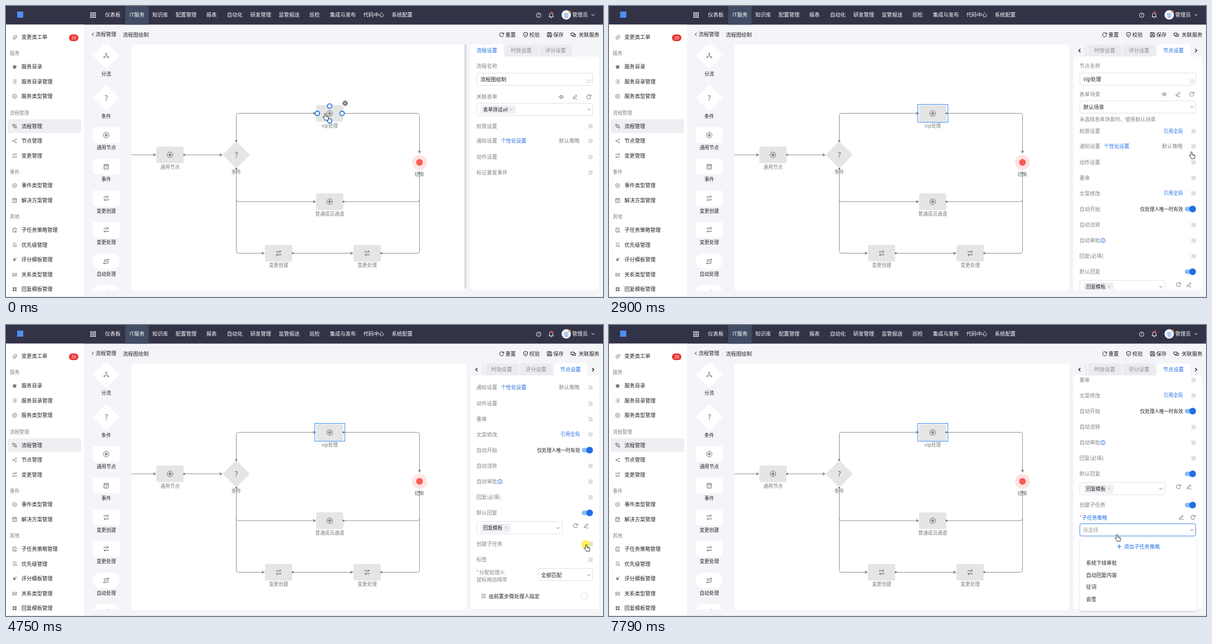
These frames come from a looping animation (1072x522 px, 8 s). An HTML page:

```html
<!DOCTYPE html>
<html lang="zh">
<head>
<meta charset="utf-8">
<title>流程图绘制</title>
<style>
html, body { margin: 0; width: 100%; height: 100%; overflow: hidden; background: #f4f5f9; }
svg { display: block; width: 100%; height: 100%; }
text { font-family: "Noto Sans CJK SC", "Noto Sans CJK", "Noto Sans", sans-serif; white-space: pre; }
</style>
</head>
<body>
<script>
const LOOP = 8000, BLUE = '#1f6fe5', INK = '#212226', GREY = '#808288', BORDER = '#dfe1e6';
let css = '', animCount = 0;

// Keyframes given in milliseconds; returns the class that plays them.
function anim(frames, ease = 'step-end') {
  const name = 'a' + animCount++;
  const all = [[0, frames[0][1]], ...frames, [LOOP, frames.at(-1)[1]]];
  css += `@keyframes ${name}{${all.map(([t, s]) => `${t / LOOP * 100}%{${s}}`).join('')}}` +
    `.${name}{animation:${name} ${LOOP}ms ${ease} infinite}`;
  return name;
}
const g = (content, cls = '', attrs = '') => `<g class="${cls}" ${attrs}>${content}</g>`;
const during = (from, to, content) => g(content, anim([
  ...(from ? [[0, 'opacity:0']] : []), [from, 'opacity:1'], ...(to < LOOP ? [[to, 'opacity:0']] : [])]));
const fadeIn = (from, to, content) => g(content, anim([[from, 'opacity:0'], [to, 'opacity:1']], 'linear'));
const fadeOut = (from, to, content) => g(content, anim([[from, 'opacity:1'], [to, 'opacity:0']], 'linear'));
const move = (points, ease) => anim(points.map(([t, x, y]) => [t, `transform:translate(${x}px,${y}px)`]), ease);

const rect = (x, y, w, h, fill, r = 0, stroke = 'none') =>
  `<rect x="${x}" y="${y}" width="${w}" height="${h}" rx="${r}" fill="${fill}" stroke="${stroke}"/>`;
const circle = (x, y, r, fill, stroke = 'none', width = 1) =>
  `<circle cx="${x}" cy="${y}" r="${r}" fill="${fill}" stroke="${stroke}" stroke-width="${width}"/>`;
const path = (d, stroke, width = 1, fill = 'none') =>
  `<path d="${d}" fill="${fill}" stroke="${stroke}" stroke-width="${width}"/>`;
const text = (x, y, s, fill = INK, size = 9.3, anchor = 'start', cls = '') =>
  `<text class="${cls}" x="${anchor === 'start' ? x - .2 : x}" y="${y + size * .37}" font-size="${size}" fill="${fill}" text-anchor="${anchor}">${s}</text>`;
const label = (x, y, s, fill = INK) => text(x, y, s, fill, 8.67, 'middle');

const ring = (x, y, r) => `M${x - r} ${y}a${r} ${r} 0 1 0 ${2 * r} 0a${r} ${r} 0 1 0 ${-2 * r} 0`;
const ICONS = {
  target: ring(0, 0, 5) + ring(0, 0, 2) + ring(0, 0, 1),
  swap: 'M-4 -1V-3H4M2 -5L4 -3L2 -1M4 1V3H-4M-2 1L-4 3L-2 5M-1 0H1',
  calendar: 'M-4 -3.5H4V4.5H-4ZM-4 -1.3H4M-2 -5V-3M2 -5V-3M-1.7 1.4L-.3 2.8L2 .4',
  branch: ring(0, -3.5, 1.2) + ring(-3.5, 3, 1.2) + ring(3.5, 3, 1.2) + 'M0 -2V0L-3 2M0 0L3 2',
  loop: 'M5 -3H-3A2 2 0 0 0 -3 0H3A2 2 0 0 1 3 3.5H-5M3 -5L5 -3L3 -1M-3 1.5L-5 3.5L-3 5.5',
  tag: 'M-4 1L1 -4L4 -3L4 0L-1 5ZM-2 1L1 -2M0 3L3 0',
  star: 'M0 -4L1.2 -1.3L4.2 -1L2 1L2.6 4L0 2.4L-2.6 4L-2 1L-4.2 -1L-1.2 -1.3Z',
  list: 'M-4 -3H-3M-2 -3H4M-4 0H-3M-2 0H4M-4 3H-3M-2 3H4',
  menu: 'M-4 -3H4M-4 0H4M-4 3H4',
  bolt: ring(0, 0, 4.2) + 'M.5 -2.5L-1.3 .3H1.3L-.5 2.5',
  flow: 'M-4 -4H-1V-1H-4ZM1 1H4V4H1ZM-2.5 -1V2.5H1M-1 -2.5H2.5V1',
  share: ring(-3, 0, 1) + ring(3, -3, 1) + ring(3, 3, 1) + 'M-2 -.5L2 -2.6M-2 .5L2 2.6',
  hex: 'M0 -4.4L3.8 -2.2V2.2L0 4.4L-3.8 2.2V-2.2ZM-2 -1L0 0L2 -1M0 0V2.5',
  task: 'M-3.5 -3.5H3.5V0M-3.5 -3.5V4H0M-1.5 -4.5H1.5M-1.5 0H1M0 4L2 1L4 4Z',
  priority: 'M-4 -3.5H4M-4 0H0M-4 3.5H-1' + ring(2.3, 2, 1.8),
  spark: 'M-.5 -2.5L.5 -.5L2.5 0L.5 1L-.5 3L-1.5 1L-3 0L-1.5 -.5ZM3 -4V-2M2 -3H4M-3.5 -3.5H-2.5',
  relation: 'M-4 -3H-1V3H-4ZM1 -3H4V0H1M1 2H4M2 3.5H4M-1 0H1',
  tiles: 'M-3.5 -3.5H-.8V-1H-3.5ZM1 -3.5H3.5V-1H1ZM-3.5 1H-.8V3.5H-3.5ZM1 1H3.5V3.5H1Z',
  refresh: 'M3.3 -1.7A3.7 3.7 0 1 0 3.6 1M3.8 -3.8V-1.2H1.2',
  shield: 'M0 -4.2L3.5 -3V0Q3.5 3 0 4.3Q-3.5 3 -3.5 0V-3ZM-1.6 0L-.2 1.3L1.8 -1',
  save: 'M-3.8 -3.8H2.5L3.8 -2.5V3.8H-3.8ZM-1.5 -3.5V-1H1.5V-3.5M-2 3.5V1H2V3.5',
  link: 'M-4.2 -3H1.5V1H-4.2ZM-1.5 1V3H4.2V-1H1.5',
  eye: 'M-4.3 0Q0 -5.4 4.3 0Q0 5.4 -4.3 0Z' + ring(0, 0, 1),
  pen: 'M-3 1.4L2 -3.6L3.5 -2L-1.4 3L-3.5 3.5ZM0 4H4',
  down: 'M-2.6 -1.3L0 1.3L2.6 -1.3',
  up: 'M-2.6 1.3L0 -1.3L2.6 1.3',
  left: 'M1.5 -3L-1.5 0L1.5 3',
  right: 'M-1.5 -3L1.5 0L-1.5 3',
  cross: 'M-2 -2L2 2M2 -2L-2 2',
  bell: 'M-4 3H4L3 1.5V-1A3 3 0 0 0 -3 -1V1.5ZM-1 4.6H1',
};
const icon = (name, x, y, color = '#6b6e75', width = 1, fill = 'none') =>
  `<g transform="translate(${x} ${y})">${path(ICONS[name], color, width, fill)}</g>`;

function header() {
  const nav = [[178, '仪表板'], [222, 'IT服务'], [263, '知识库'], [305, '配置管理'], [360, '报表'], [397, '自动化'],
    [439, '研发管理'], [490, '监管报送'], [545, '巡检'], [582, '集成与发布'], [642, '代码中心'], [693, '系统配置']];
  let out = rect(0, 0, 1072, 33.4, '#333348') + rect(214, 0, 42, 33.4, '#424c62') + rect(20, 10, 11, 11, '#4e8ef5');
  for (let i = 0; i < 9; i++) out += rect(151.5 + i % 3 * 3.6, 11.5 + Math.floor(i / 3) * 3.6, 2.4, 2.4, '#fff');
  out += nav.map(([x, s]) => text(x, 16, s, '#fff')).join('');
  out += circle(956.5, 16.5, 4, 'none', '#fff') + text(956.5, 16.5, '?', '#fff', 6.5, 'middle');
  out += icon('bell', 979, 16.5, '#fff') + circle(980, 12, 2, '#f0453f');
  out += circle(1006, 16, 8.5, '#eef3fb') + text(1006, 16.5, '管', '#5a8fe0', 8.5, 'middle') + circle(1012, 10.5, 2, '#f0a04b');
  return out + text(1017, 16, '管理员', '#fff') + icon('down', 1054, 16, '#fff');
}

function sidebar() {
  const heads = [[85, '服务'], [192, '流程管理'], [298, '事件'], [378, '其他']];
  const items = [[56, 'tag', '变更类工单'], [109, 'star', '服务目录'], [135.5, 'list', '服务目录管理'], [162, 'bolt', '服务类型管理'],
    [215.5, 'flow', '流程管理'], [242, 'share', '节点管理'], [268.5, 'swap', '变更管理'], [322, 'hex', '事件类型管理'],
    [348.5, 'calendar', '解决方案管理'], [402, 'task', '子任务策略管理'], [428.5, 'priority', '优先级管理'],
    [455, 'spark', '评分模板管理'], [482, 'relation', '关系类型管理'], [508, 'tiles', '回复模板管理']];
  const solid = ['star', 'tiles', 'spark'];
  return rect(0, 33.4, 140, 489, '#fff') + rect(3, 203, 132, 25, '#eeeff2', 3) +
    heads.map(([y, s]) => text(7, y, s, GREY, 8.67)).join('') +
    items.map(([y, i, s]) => `<g transform="translate(15.5 ${y}) scale(.88)">${path(ICONS[i], '#6b6e75', 1, solid.includes(i) ? '#6b6e75' : 'none')}</g>` + text(28, y, s)).join('') +
    rect(113, 51, 17, 12, '#e93533', 6) + text(121.5, 57, '39', '#fff', 8, 'middle');
}

function toolbar() {
  const tools = [[890, 'refresh', '重置'], [933, 'shield', '校验'], [976, 'save', '保存'], [1018.5, 'link', '关联服务']];
  return icon('left', 156, 51, INK) + text(161, 51, '流程管理') + rect(204, 42, 1, 18, '#e6e8ec') + text(210, 51.5, '流程图绘制') +
    tools.map(([x, i, s]) => icon(i, x, 51.5, INK) + text(x + (s.length > 2 ? 10 : 7), 51.5, s)).join('');
}

const diamond = (x, y, r, fill) => path(`M${x} ${y - r}L${x + r} ${y}L${x} ${y + r}L${x - r} ${y}Z`, fill, 2, fill);
const question = (x, y) => text(x, y, '?', '#666', 13, 'middle');

function palette() {
  const boxes = [[231.5, 'target', '通用节点'], [288, 'calendar', '事件'], [345, 'swap', '变更创建'], [401.5, 'swap', '变更处理'], [458, 'loop', '自动处理'], [514.5, 'loop', '']];
  const out = diamond(180, 89, 22.5, '#fff') + icon('branch', 180, 89) + label(180, 121.5, '分流') +
    diamond(180, 165, 22.5, '#fff') + question(180, 165) + label(180, 197.5, '条件') +
    boxes.map(([y, i, s]) => rect(156, y - 14, 48, 28, '#fff', i === 'loop' ? 14 : 2) + icon(i, 180, y) + label(180, y + 22.5, s)).join('');
  return g(out, '', 'clip-path="url(#work)"');
}

const EDGE = '#8f8f8f';
const node = (x, y, i, s) => rect(x - 24.5, y - 15, 49, 30, '#e5e5e5', 3) + icon(i, x, y, '#6a6a6a') + label(x, y + 21.7, s, '#76787c');
const arrow = (x, y, turn = 0) => `<path d="M0 0L-6 -3L-4.5 0L-6 3Z" fill="#858585" transform="translate(${x} ${y}) rotate(${turn})"/>`;

function canvas() {
  const edges = ['M225 267H268', 'M320 267H387', 'M413.5 242V196.5Q413.5 192.5 417.5 192.5H555', 'M606 192.5H738.5Q742.5 192.5 742.5 196.5V263',
    'M413.5 292V347Q413.5 351 417.5 351H555', 'M606 351H738.5Q742.5 351 742.5 347V297',
    'M413.5 292V439.5Q413.5 443.5 417.5 443.5H463', 'M515 443.5H622', 'M674 443.5H738.5Q742.5 443.5 742.5 439.5V297'];
  const heads = [[270, 267], [389, 267], [557, 192.5], [557, 351], [465, 443.5], [624, 443.5], [742.5, 265, 90], [742.5, 296, -90]];
  const dots = [[320, 267], [413.5, 242], [413.5, 292], [606, 192.5], [606, 351], [515, 443.5], [674, 443.5]];
  const ports = [[581.2, 179.5], [559, 192.7], [603.5, 192.7], [581.2, 206]];
  return rect(225, 69, 602, 442, '#fff', 5) + during(0, 2580, rect(823, 69, 4, 438, '#dcdde0')) +
    edges.map(d => path(d, EDGE)).join('') +
    node(294.5, 267, 'target', '通用节点') + diamond(413.5, 267, 23, '#e5e5e5') + question(413.5, 267.5) + label(413.5, 297.5, '条件', '#76787c') +
    node(581.2, 192.7, 'target', 'vip处理') + node(581.2, 351, 'target', '普通成员通道') +
    node(489.5, 443.5, 'swap', '变更创建') + node(648.5, 443.5, 'swap', '变更处理') +
    circle(742.5, 280.5, 13.5, '#fde4e2') + circle(742.5, 280.5, 6, '#f95b53') + label(742.5, 301.5, '结束', '#76787c') +
    heads.map(h => arrow(...h)).join('') + dots.map(([x, y]) => circle(x, y, 1.8, '#777')).join('') +
    during(1120, LOOP, rect(554.5, 176.5, 54, 32, 'none', 0, '#3d8df0')) +
    during(0, 2436, ports.map(([x, y]) => circle(x, y, 4, '#fff', '#1a73e0', 1.7)).join('')) +
    fadeOut(392, 560, circle(609, 174.5, 4.7, '#777') + icon('cross', 609, 174.5, '#fff'));
}

const tabs = (names, active) => names.map((s, i) => {
  const x = 834 + i * 61.7;
  return rect(x, 69, 59.5, 27, i === active ? '#fff' : '#ebecef', 4) + text(x + 11, 80, s, i === active ? BLUE : '#8a8c91');
}).join('');

const track = on => on
  ? rect(1034, 360.5, 18, 8, '#8db9f4', 4) + circle(1048, 364.5, 6, BLUE)
  : rect(1036, 360.5, 18, 8, '#dfe0e2', 4) + circle(1040.5, 364.5, 5.8, '#fff', '#f3f3f4', .6);
const toggle = (y, on) => `<g transform="translate(0 ${y - 364.5})">${track(on)}</g>`;
const row = (y, s, on) => text(845, y, s, GREY) + toggle(y, on);
const field = (y, h = 22, x = 845, w = 209) => rect(x + .5, y + .5, w - 1, h, '#fff', 3, BORDER);
const select = (y, s, color = INK) => field(y - 11.5) + text(852, y, s, color) + icon('down', 1046.5, y);
const chip = (y, s, w) => rect(852, y - 8, w, 16, '#f0f1f4', 2) + text(857, y, s, INK, 8.67) + icon('cross', 852 + w - 8, y - .5, '#aaa', .8);
const formIcons = y => icon('eye', 997, y) + icon('pen', 1021.5, y) + icon('refresh', 1046.5, y);
const notice = y => row(y, '通知设置') + text(889, y, '个性化设置', BLUE, 9.1) + text(993, y, '默认策略', GREY);
const inherit = y => text(996, y, '引用全局', BLUE, 8.67);
const nameField = (title, s) => text(845, 108, title, GREY) + field(120) + text(852, 131.5, s) + text(1051, 135.5, '25', '#b9bbc0', 8, 'end');
const required = (x, y, s, cls) => text(845, y, '*', '#ed4a3c', 8) + text(x, y, s, GREY, 9.2, 'start', cls);

const flowForm = () => nameField('流程名称', '流程图绘制') + text(845, 163, '关联表单', GREY) + formIcons(163) +
  select(185.5, '') + chip(186, '表单测试all', 63) + row(215.5, '权限设置') + notice(242) + row(271, '动作设置') + row(299, '标记重复事件');

function subtaskFields() {
  const blueLabel = anim([[7320, `fill:${GREY}`], [7560, `fill:${BLUE}`]], 'linear');
  const border = rect(845.5, 566.5, 208, 22, 'none', 3, '#4a8cea');
  return required(849, 555.5, '子任务策略', blueLabel) + icon('pen', 1027.5, 555) + icon('refresh', 1048.5, 555) +
    field(566) + text(851, 577.7, '请选择', '#a0a2a8') +
    during(0, 7320, icon('down', 1046.5, 578)) + during(7320, LOOP, icon('up', 1046.5, 578)) +
    during(5620, 6500, border) + during(7080, LOOP, border) +
    text(848, 602.5, '处理人过滤', GREY, 9.2) + select(620.5, '请选择', '#a0a2a8') +
    text(848, 645, '不填写时，不限制处理人范围', INK, 9.15);
}

function nodeForm() {
  const tail = row(561, '标签') + required(850, 583.5, '分配处理人') + text(845, 597, '鼠标拖动排序', GREY, 9.2) +
    field(576, 22, 955, 99) + text(961, 588.5, '全部匹配') + icon('down', 1046.5, 588.5) +
    icon('menu', 857.5, 626, '#777') + text(867, 626.5, '由前置步骤处理人指定', INK, 9.15) + rect(1033.5, 620.5, 10, 10, '#fff', 1, BORDER);
  return nameField('节点名称', 'vip处理') + text(845, 158.5, '表单场景', GREY) + formIcons(158.5) + select(181.5, '默认场景') +
    text(845, 203.5, '未选择表单场景时，使用默认场景', GREY, 9.15) +
    row(225, '权限设置') + inherit(225) + notice(252) + row(281, '动作设置') + row(309, '重审') +
    row(336.5, '文案修改') + inherit(336) + row(364.5, '自动开始', true) + text(954, 364.5, '仅处理人唯一时有效', INK, 8.55) +
    row(393, '自动流转') + row(421, '自动审批') + circle(887, 421, 3.8, 'none', BLUE) + path('M887 420.3V423.2M887 418.6V419.5', BLUE) +
    row(449, '回复(必填)') + row(477, '默认回复', true) +
    field(492, 22, 845, 154) + chip(504, '回复模板', 54) + icon('down', 991, 504) + icon('refresh', 1022.5, 500) + icon('pen', 1041.5, 500) +
    text(845, 533, '创建子任务', GREY) + fadeOut(4840, 5000, toggle(533)) + fadeIn(4840, 5000, toggle(533, true)) +
    during(4920, LOOP, subtaskFields()) + g(tail, move([[4919, 0, 0], [4920, 0, 109]]));
}

function panel() {
  const names = ['流程设置', '时效设置', '评分设置', '节点设置'];
  const slide = move([[1570, 13, 0], [2055, -35, 0]], 'ease-in-out');
  const scroll = move([[2900, 0, 0], [3200, 0, -100], [3370, 0, -140], [6460, 0, -140], [6780, 0, -202], [6950, 0, -210]], 'linear');
  const arrows = icon('left', 845, 80, INK, 1.4) + icon('right', 1054, 80, INK, 1.4);
  return during(0, 1570, tabs(names.slice(0, 3), 0)) +
    during(1570, LOOP, g(g(tabs(names, 3), slide), '', 'clip-path="url(#tabs)"') + arrows) +
    rect(834, 90.5, 231, 419, '#fff', 5) +
    g(during(0, 1570, flowForm()) + during(1570, LOOP, g(nodeForm(), scroll)), '', 'clip-path="url(#form)"');
}

function dropdown() {
  const items = ['系统下线审批', '自动回复内容', '征词', '会签'];
  const list = path('M912.5 397.5H920M916.2 393.7V401.3', BLUE, 1.2) + text(925, 397.5, '添加子任务策略', BLUE, 9.2) +
    items.map((s, i) => text(857, 427 + i * 21.5, s, INK, 9.2)).join('');
  return fadeIn(7190, 7320, g(rect(845.5, 382, 209, 131, '#fff', 3), '', 'filter="url(#shadow)"')) + fadeIn(7320, 7600, list);
}

function cursor() {
  const hand = g(path('M-1.2 1Q0 -.8 1.2 1V5L5.5 6Q6.6 6.4 6.4 7.6L5.6 11V12.6H-.6V11L-3.8 7.6Q-4 6 -2.4 6.3L-1.2 7.3Z', '#222', .9, '#fff') +
    path('M2.7 5.5V7.4M4.4 5.9V7.6', '#222', .7), '', 'transform="translate(1 .3)"');
  const pointer = path('M0 0V10L2.4 8L4 11.6L5.5 11L4 7.4H7Z', '#222', .9, '#fff');
  const halo = g(circle(0, 1, 8, '#fbee2a'), '', 'opacity=".75"');
  const spans = [[0, 2436], [2800, 5000], [5380, 6540], [7020, LOOP]];
  const gaps = spans.slice(1).map(([from], i) => [spans[i][1], from]);
  const route = move([[2340, 572, 192], [2820, 1045, 261], [3510, 1045, 261], [3990, 1040, 399], [4440, 1040, 399], [4520, 1041, 393],
    [4950, 1041, 393], [5540, 911, 437], [6460, 911, 437], [6780, 914, 421], [7080, 911.5, 375]], 'ease-in-out');
  return g([[1120, 1250], [4750, 4840], [7160, 7240]].map(([a, b]) => during(a, b, halo)).join('') +
    spans.map(([a, b]) => during(a, b, hand)).join('') + gaps.map(([a, b]) => during(a, b, pointer)).join(''), route);
}

const clip = (id, x, y, w, h) => `<clipPath id="${id}">${rect(x, y, w, h, '#000')}</clipPath>`;
const scene = `<defs>${clip('work', 150, 69, 75, 441.5)}${clip('tabs', 855, 69, 189, 22)}${clip('form', 834, 91, 231, 418)}
  <filter id="shadow" x="-10%" y="-10%" width="120%" height="120%"><feDropShadow dx="0" dy="1" stdDeviation="1.6" flood-opacity=".2"/></filter></defs>` +
  rect(0, 0, 1072, 522, '#f4f5f9') + header() + sidebar() + toolbar() + palette() + canvas() + panel() + dropdown() +
  rect(0, 521, 1072, 1, '#dde1e8') + cursor();
document.head.insertAdjacentHTML('beforeend', `<style>${css}</style>`);
document.body.innerHTML = `<svg viewBox="0 0 1072 522" xmlns="http://www.w3.org/2000/svg">${scene}</svg>`;
</script>
</body>
</html>
```
